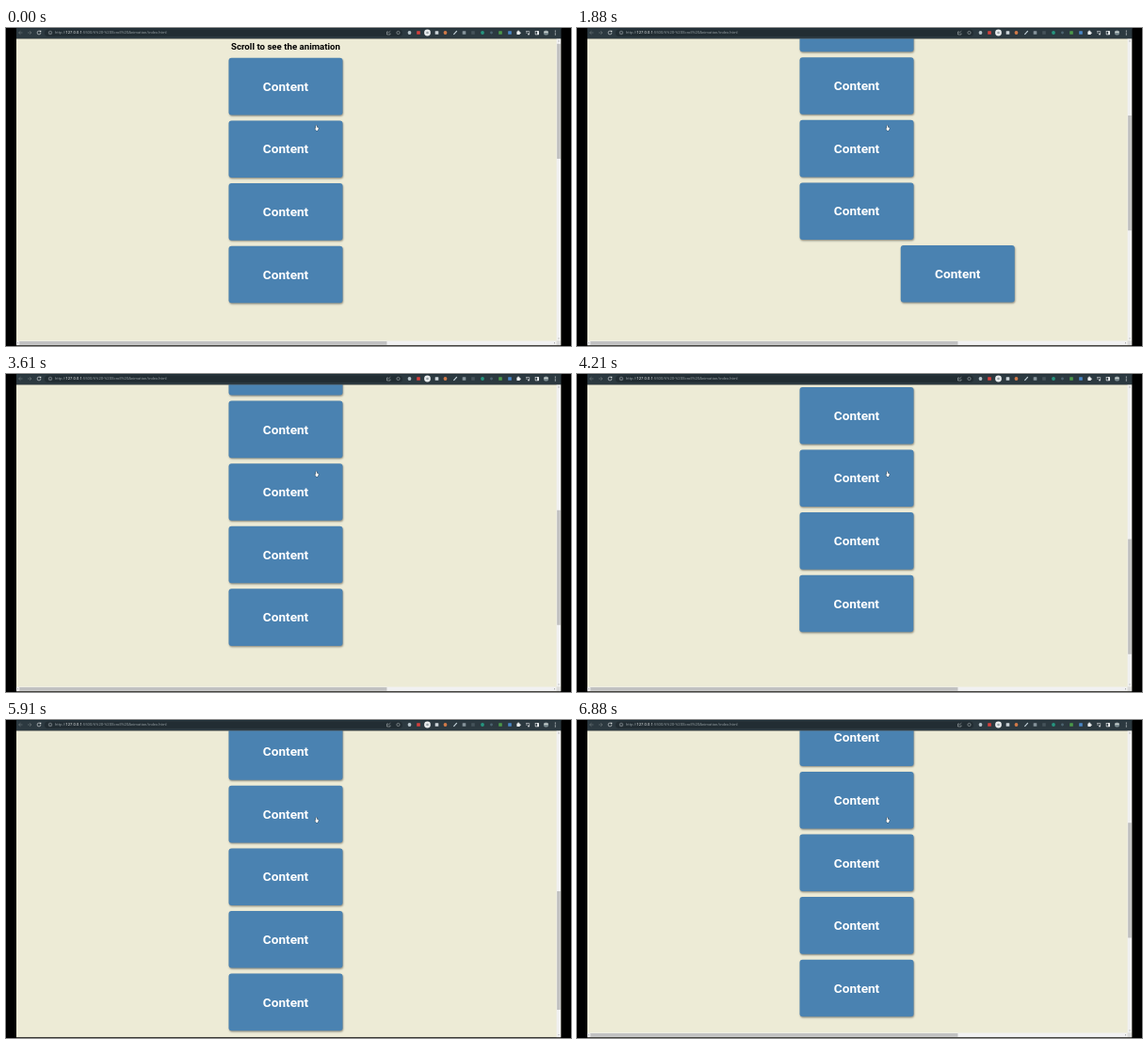
Animation of 600 by 338 pixels, one loop 6.91 s. Source, as an HTML page with a canvas:

```html
<!DOCTYPE html>
<html lang="en">
<head>
<meta charset="utf-8">
<title>Scroll animation</title>
<style>
html, body { margin: 0; width: 100%; height: 100%; overflow: hidden; background: #000; }
canvas { display: block; width: 600px; height: 338px; }
</style>
</head>
<body>
<canvas width="600" height="338"></canvas>
<script>
const ctx = document.querySelector('canvas').getContext('2d');
const LOOP = 6910, SLIDE = 400, FAR = 484;
const PAGE = { left: 11, top: 11.2, right: 584.6, bottom: 337.2 };
const BOX = { x: 236.5, y: 32, w: 121, h: 60.6, pitch: 66.6, count: 12 };
const TRIGGER = 272, CONTENT_H = 822, BAR = 4.7;

// Scroll position over time: [ms, px]
const SCROLL = [
  [0, 0], [190, 27], [290, 54], [560, 62], [720, 86], [910, 94.7], [980, 96],
  [1250, 122], [1450, 127], [1600, 152], [1695, 160], [1785, 176], [1880, 200.5],
  [2050, 216], [2300, 218], [2510, 226.2], [2590, 234], [2800, 262], [2940, 272.4],
  [3050, 275], [3200, 293], [3285, 306], [3500, 332], [3700, 340], [3825, 359.6],
  [4000, 390], [4210, 417.6], [4290, 427], [4600, 455], [4830, 492.7], [4950, 496],
  [5560, 496], [5640, 485], [5910, 428.6], [6400, 330], [6620, 293], [6910, 238]
];

function scrollAt(t) {
  const i = SCROLL.findIndex(p => p[0] > t);
  const [t0, s0] = SCROLL[i - 1], [t1, s1] = SCROLL[i];
  return s0 + (s1 - s0) * (t - t0) / (t1 - t0);
}

// Time at which the scroll passes a level, going down (1) or up (-1) the page
function crossing(level, dir) {
  for (let i = 1; i < SCROLL.length; i++) {
    const [t0, s0] = SCROLL[i - 1], [t1, s1] = SCROLL[i];
    if ((level - s0) * dir >= 0 && (s1 - level) * dir > 0)
      return t0 + (t1 - t0) * (level - s0) / (s1 - s0);
  }
  return Infinity;
}

// CSS "ease": cubic-bezier(.25, .1, .25, 1)
function ease(x) {
  if (x <= 0) return 0;
  if (x >= 1) return 1;
  const bez = (a, b, u) => 3 * a * u * (1 - u) ** 2 + 3 * b * u * u * (1 - u) + u ** 3;
  let lo = 0, hi = 1;
  for (let i = 0; i < 20; i++) {
    const mid = (lo + hi) / 2;
    if (bez(.25, .25, mid) < x) lo = mid; else hi = mid;
  }
  return bez(.1, 1, lo);
}

const boxes = Array.from({ length: BOX.count }, (_, i) => {
  const y = BOX.y + i * BOX.pitch, level = y - TRIGGER;
  return {
    y, side: i % 2 ? -1 : 1,
    shown: level < 0 ? -SLIDE : crossing(level, 1),
    hidden: level < 0 ? Infinity : crossing(level, -1)
  };
});

const offset = (b, t) =>
  b.side * FAR * (1 - ease((t - b.shown) / SLIDE) + ease((t - b.hidden) / SLIDE));

function rect(color, x, y, w, h, r = 0) {
  ctx.fillStyle = color;
  ctx.beginPath();
  ctx.roundRect(x, y, w, h, r);
  ctx.fill();
}

function dot(color, x, y, r) {
  ctx.fillStyle = color;
  ctx.beginPath();
  ctx.arc(x, y, r, 0, 7);
  ctx.fill();
}

function line(color, width, points) {
  ctx.strokeStyle = color;
  ctx.lineWidth = width;
  ctx.beginPath();
  points.forEach(p => ctx.lineTo(...p));
  ctx.stroke();
}

function ring(color, x, y, r, end = 7) {
  ctx.strokeStyle = color;
  ctx.lineWidth = .6;
  ctx.beginPath();
  ctx.arc(x, y, r, 0, end);
  ctx.stroke();
}

function text(str, x, y, font, color, align = 'center') {
  ctx.font = font + ' Roboto, sans-serif';
  ctx.fillStyle = color;
  ctx.textAlign = align;
  ctx.fillText(str, x, y);
}

function triangle(x, y, dx, dy) {
  ctx.fillStyle = '#777';
  ctx.beginPath();
  ctx.moveTo(x + dx, y + dy);
  ctx.lineTo(x - dy, y + dx);
  ctx.lineTo(x + dy, y - dx);
  ctx.fill();
}

function drawToolbar() {
  rect('#2c3940', 11, 0, 578.5, 11.2);
  rect('#203038', 11, 0, 578.5, 1);
  rect('#222d33', 41, 1.4, 380, 7.6, 3.8);
  for (const [x, d] of [[15.5, -1], [25, 1]]) {
    line('#71797d', .6, [[x - 2 * d, 5], [x + 2 * d, 5]]);
    line('#71797d', .6, [[x, 3.2], [x + 2 * d, 5], [x, 6.8]]);
  }
  ring('#dde0e2', 35, 5, 1.9, 5.4);
  rect('#dde0e2', 35.8, 2.8, 1.5, 1.5);
  ring('#9aa2a6', 47, 5, 1.8);
  rect('#9aa2a6', 46.7, 4.6, .6, 1.5);

  let x = 52;
  for (const [part, color] of [['http://', '#8f989c'], ['127.0.0.1', '#e4e7e8'],
    [':5500/6%20-%20Scroll%20Animation/index.html', '#8f989c']]) {
    text(part, x, 6.4, '4.2px', color, 'left');
    x += ctx.measureText(part).width;
  }

  line('#a9b0b3', .6, [[406, 4], [404.5, 4], [404.5, 7], [408, 7], [408, 5.5]]);
  line('#a9b0b3', .6, [[405.7, 5.5], [408.3, 3.2]]);
  ring('#a9b0b3', 416.5, 5, 1.6);
  for (const [cx, color, r] of [[428.5, '#b7c4ca', 1.9], [447.5, '#e9eced', 3.4],
    [466.5, '#d17a48', 1.9], [506, '#26967f', 1.9], [515.5, '#4d6470', 1.4]])
    dot(color, cx, 5, r);
  dot('#9aa4a9', 447.5, 5, 1.3);
  for (const [cx, color] of [[438, '#d9403c'], [457.5, '#cdd5d9'], [486.5, '#87959c'],
    [496, '#46545b'], [525, '#4c9a4a'], [535, '#4b88c8']])
    rect(color, cx - 1.8, 3.2, 3.6, 3.6, .4);
  line('#c8d6dd', 1.1, [[475.4, 6.8], [478.8, 3.2]]);
  rect('#eef0f1', 542.4, 3.6, 3.4, 3.4, .4);
  dot('#eef0f1', 544.1, 3.3, .8);
  dot('#eef0f1', 546, 5.3, .8);
  line('#dde0e2', .6, [[552, 3.5], [555, 3.5]]);
  line('#dde0e2', .6, [[552, 5], [554, 5]]);
  line('#dde0e2', .6, [[555.7, 3], [555.7, 6.5]]);
  dot('#dde0e2', 555, 6.5, .9);
  rect('#eef0f1', 561.8, 3, 4.2, 4.2, .4);
  rect('#2c3940', 562.4, 3.6, 1.7, 3);
  dot('#7c8c91', 573.5, 5, 2.6);
  rect('#c9d0ce', 571.4, 3.6, 4.2, 1.4);
  for (const y of [3.1, 5, 6.9]) dot('#e4e7e8', 583.3, y, .55);
}

function drawBox(x, y) {
  ctx.shadowColor = 'rgba(0,0,0,.4)';
  ctx.shadowOffsetX = .6;
  ctx.shadowOffsetY = 1.2;
  ctx.shadowBlur = 2;
  rect('#4a82b1', x, y, BOX.w, BOX.h, 3);
  ctx.shadowColor = 'transparent';
  text('Content', x + BOX.w / 2, y + 35, 'bold 13.62px', '#fff');
}

function drawScrollbars(scroll, contentW) {
  const viewW = PAGE.right - PAGE.left;
  const hasBar = contentW > viewW;
  const bottom = PAGE.bottom - (hasBar ? BAR : 0);
  const viewH = bottom - PAGE.top, track = viewH - 8.8;
  rect('#f1f1f1', PAGE.right, PAGE.top, BAR, viewH);
  rect('#c1c1c1', PAGE.right + .5, 16.8 + scroll * track / CONTENT_H, BAR - 1, track * viewH / CONTENT_H);
  triangle(587, 14.2, 0, -.9);
  triangle(587, bottom - 2.8, 0, .9);
  if (!hasBar) return;
  rect('#f1f1f1', PAGE.left, bottom, viewW, BAR);
  rect('#dcdcdc', PAGE.right, bottom, BAR, BAR);
  rect('#c1c1c1', 14.2, bottom + .5, 565 * viewW / contentW, BAR - 1);
  triangle(12.8, bottom + 2.3, -.9, 0);
  triangle(582, bottom + 2.3, .9, 0);
}

function drawCursor() {
  ctx.beginPath();
  [[329.2, 103.6], [330, 103.6], [330.2, 105.4], [331.8, 106], [331.6, 107.6], [331, 108.9],
    [329.4, 108.9], [328, 106.8], [329.1, 106.6]].forEach(p => ctx.lineTo(...p));
  ctx.closePath();
  ctx.strokeStyle = '#26333c';
  ctx.lineWidth = .8;
  ctx.stroke();
  ctx.fillStyle = '#fff';
  ctx.fill();
}

function draw() {
  const t = performance.now() % LOOP;
  const scroll = scrollAt(t);
  rect('#000', 0, 0, 600, 338);
  ctx.save();
  ctx.beginPath();
  ctx.rect(PAGE.left, PAGE.top, 578.3, PAGE.bottom - PAGE.top);
  ctx.clip();
  rect('#edebd6', 0, 0, 600, 338);
  text('Scroll to see the animation', 297, 23.3 - scroll, 'bold 9.68px', '#000');
  let contentW = 0;
  for (const b of boxes) {
    const x = BOX.x + offset(b, t);
    contentW = Math.max(contentW, x + BOX.w - PAGE.left);
    drawBox(x, b.y - scroll);
  }
  drawScrollbars(scroll, contentW);
  ctx.restore();
  drawToolbar();
  drawCursor();
  requestAnimationFrame(draw);
}
draw();
</script>
</body>
</html>
```
